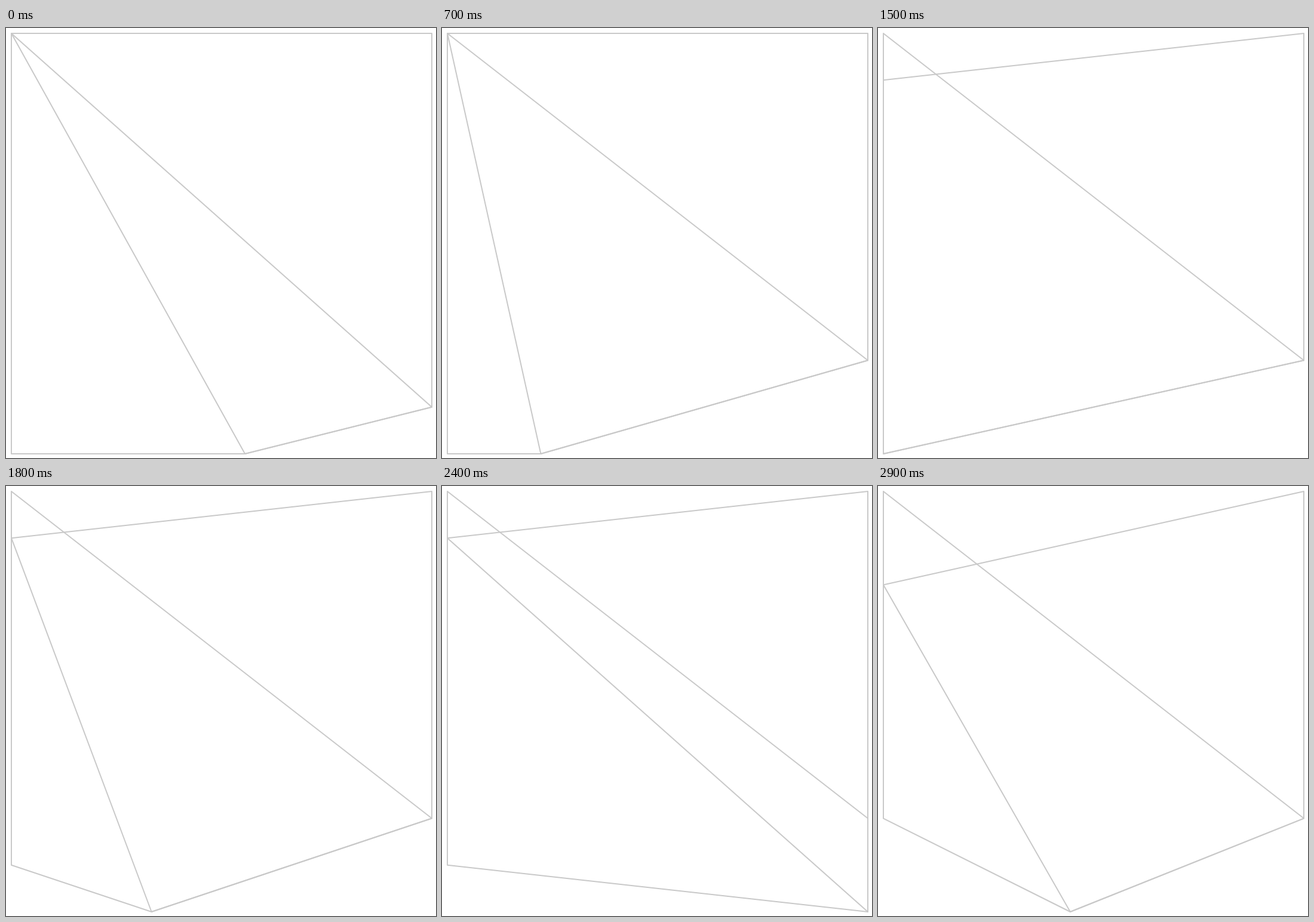
Write an HTML page with a canvas that moves like this. It is 720 by 720 pixels and loops after 3000 ms.

```html
<!DOCTYPE html>
<html lang="en">
<head>
<meta charset="utf-8">
<title>Digit quadrilaterals</title>
<style>
  html, body { margin: 0; width: 100%; height: 100%; overflow: hidden; background: #fff; }
  canvas { display: block; }
</style>
</head>
<body>
<canvas id="stage" width="720" height="720"></canvas>
<script>
const ctx = document.getElementById('stage').getContext('2d');
const STEP_MS = 100, STEPS = 30, FIRST = 195;
const MARGIN = 9, UNIT = 704 / 9;
const place = digit => MARGIN + digit * UNIT;

function quad(points) {
  ctx.beginPath();
  for (const [x, y] of points) ctx.lineTo(place(x), place(y));
  ctx.closePath();
  ctx.stroke();
}

// Each digit of the counter sets a point on one side of the square.
function draw(count) {
  const ones = count % 10;
  const tens = Math.floor(count / 10) % 10;
  const hundreds = Math.floor(count / 100);
  const high = Math.min(tens, 9 - tens);
  const right = [9, 9 - hundreds], bottom = [ones, 9];

  ctx.fillStyle = '#fff';
  ctx.fillRect(0, 0, 720, 720);
  ctx.strokeStyle = '#c9c9c9';
  ctx.lineWidth = 2;
  ctx.lineJoin = 'round';
  quad([[9, 0], right, bottom, [0, high]]);
  quad([[0, 0], right, bottom, [0, 9 - high]]);
}

const start = performance.now();
function tick() {
  const elapsed = performance.now() - start;
  draw(FIRST + Math.floor(elapsed / STEP_MS) % STEPS);
  requestAnimationFrame(tick);
}
tick();
</script>
</body>
</html>
```
